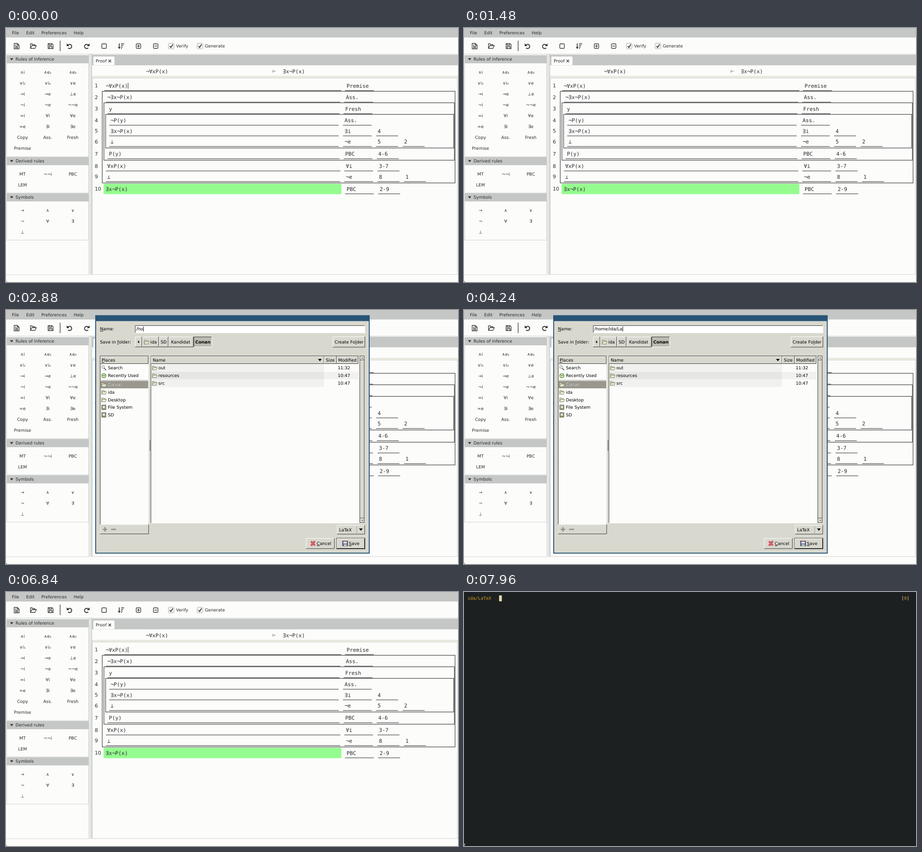
Animation of 998x561 px, one loop 8000 ms. Source, as an HTML page:

```html
<!DOCTYPE html>
<html lang="en">
<head>
<meta charset="utf-8">
<title>Proof editor export</title>
<style>
html, body { margin: 0; width: 100%; height: 100%; overflow: hidden; background: #fcfdfa; }
svg { display: block; width: 998px; height: 561px; }
text { font: 9.5px "DejaVu Sans", sans-serif; fill: #2b2b2b; white-space: pre; text-rendering: geometricPrecision; }
.mono { font: 11.6px "DejaVu Sans Mono", monospace; }
.term { font: 9.6px "DejaVu Sans Mono", monospace; }
.num { font-size: 11px; }
.bold { font-weight: bold; }
.mid { text-anchor: middle; }
.black { fill: #000; }
.white { fill: #fff; }
</style>
</head>
<body>
<svg id="stage" viewBox="0 0 998 561"></svg>
<script>
const stage = document.getElementById('stage');
const LOOP = 8000;
const GREY = '#c4c7c5', INK = '#333', PANEL = '#d9d8cf', PAPER = '#fcfdfb';

// ---- drawing helpers; text is placed by its vertical centre, "_" marks a mnemonic
const rect = (x, y, x2, y2, fill, extra = '') =>
  `<rect x="${x}" y="${y}" width="${x2 - x}" height="${y2 - y}" fill="${fill}" ${extra}/>`;
const line = (x, y, x2, y2, color = INK, w = 1) =>
  `<path d="M${x} ${y}L${x2} ${y2}" stroke="${color}" stroke-width="${w}"/>`;
const path = (d, fill = 'none', stroke = 'none', w = 1.4) =>
  `<path d="${d}" fill="${fill}" stroke="${stroke}" stroke-width="${w}"/>`;
const text = (x, y, s, cls = '', size = 9.5) =>
  `<text x="${x}" y="${y + size * 0.36}" class="${cls}">` +
  s.replace(/_(.)/, '<tspan text-decoration="underline">$1</tspan>') + '</text>';
const mono = (x, y, s) => text(x, y, s, 'mono', 11.6);
const group = (id, body) => `<g id="${id}">${body}</g>`;
const at = (x, y, body) => `<g transform="translate(${x} ${y})">${body}</g>`;
const triangle = (x, y, r, color = INK) =>
  path(`M${x - r} ${y - r * .6}h${2 * r}l${-r} ${r * 1.3}z`, color);
const bevel = (x, y, x2, y2, fill = PANEL, sunk = false) => {
  const [a, b] = sunk ? ['#333', '#fff'] : ['#fff', '#333'];
  return rect(x, y, x2, y2, fill) +
    path(`M${x + .5} ${y2}V${y + .5}H${x2}`, 'none', a, 1) +
    path(`M${x} ${y2 - .5}H${x2 - .5}V${y}`, 'none', b, 1);
};

// ---- proof editor
function toolbar() {
  const outline = (d, w = 1.4) => path(d, 'none', INK, w);
  return at(23, 40, outline('M-5 -6H2L6 -2V6H-5ZM2 -6V-2H6M-3 -2H0M-3 1H4M-3 3.5H4', 1.3)) +
    at(60, 40, outline('M-6 4V-5H-2L-1 -3H4V-1M-6 5L-3 -1H7L4 5Z', 1.3)) +
    at(98.5, 40, outline('M-5.5 -5.5H3L5.5 -3V5.5H-5.5ZM-3 -5V-2H2V-5M-3 5V1H3V5', 1.4)) +
    line(119.5, 28, 119.5, 51, '#222', 1.2) +
    at(140, 40, outline('M-4 -1A4.7 4.7 0 1 1 -3 4', 1.9) + path('M-6 -6V0H0Z', INK)) +
    at(178.5, 40, outline('M4 -1A4.7 4.7 0 1 0 3 4', 1.9) + path('M6 -6V0H0Z', INK)) +
    rect(211.5, 35, 221.5, 45, 'none', `rx="1.5" stroke="${INK}" stroke-width="1.4"`) +
    at(254, 40, outline('M-4 -6V4M0 -5H7M0 -1.5H5M0 2H3.5M0 5.2H2', 1.7) + path('M-7 2H-1L-4 6.5Z', INK)) +
    [292.5, 330.5].map((x, i) =>
      rect(x - 5, 35, x + 5, 45, 'none', `rx="1.5" stroke="${INK}" stroke-width="1.3"`) +
      line(x - 3, 40, x + 3, 40, INK, 1.4) + (i ? '' : line(x, 37, x, 43, INK, 1.4))).join('') +
    [[358.5, 'Verify'], [422, 'Generate']].map(([x, s]) =>
      rect(x, 33.5, x + 12.5, 46, '#f4f5f3', 'rx="2" stroke="#aaa"') +
      path(`M${x + 3} 40L${x + 5.5} 43L${x + 10} 36`, 'none', INK, 1.8) +
      text(x + 17, 40, s)).join('');
}

function sidePane(y, bottom, title, rows) {
  return rect(1.5, y + .5, 182.5, bottom, PAPER, 'stroke="#d0d2cf"') +
    rect(1, y, 183, y + 18, GREY) + triangle(12.5, y + 9, 3.6) + text(21, y + 9, title) +
    rows.map((row, r) => row.split(' ').map((s, c) =>
      text(36.5 + 55.5 * c, y + 37.2 + 24.1 * r, s, 'mid')).join('')).join('');
}

const proof = [ // centre y, depth, formula, rule, references
  [127.5, 0, '¬∀xP(x)', 'Premise'],
  [153, 1, '¬∃x¬P(x)', 'Ass.'],
  [178.5, 2, 'y', 'Fresh'],
  [204, 3, '¬P(y)', 'Ass.'],
  [227.5, 3, '∃x¬P(x)', '∃i', '4'],
  [251, 3, '⊥', '¬e', '5', '2'],
  [278, 2, 'P(y)', 'PBC', '4-6'],
  [305, 1, '∀xP(x)', '∀i', '3-7'],
  [328.5, 1, '⊥', '¬e', '8', '1'],
  [355.5, 0, '∃x¬P(x)', 'PBC', '2-9'],
];

function proofRow([y, d, formula, rule, ...refs], i) {
  const under = (x, x2) => line(x, y + 10.7, x2, y + 10.7, '#222', 1.1);
  const r = -1.5 * d, last = i === proof.length - 1;
  return text(196, y, String(i + 1), 'num', 11) +
    (last ? rect(215.5, 344, 740.5, 367, '#95fc8f', 'rx="2"') : under(217 + 3.6 * d, 740 - 1.8 * d)) +
    mono(220 + 3.6 * d, y, formula) +
    mono(752 + r, y, rule) + under(748.5 + r, 812 + r) +
    refs.map((s, k) => mono(825 + 58.5 * k + r, y, s) +
      under(821.7 + 58.5 * k + r, 870.3 + 58.5 * k + r)).join('');
}

function editor() {
  const frame = (x, y, x2, y2) => rect(x, y, x2, y2, 'none', 'stroke="#555" stroke-width="1.4"');
  return rect(0, 0, 998, 561, PAPER) + rect(0, 0, 998, 21, GREY) +
    group('fileOn', rect(6, 0, 36, 21, '#149fc3')) +
    group('fileText', text(13, 11, 'File')) +
    text(44.5, 11, 'Edit') + text(78, 11, 'Preferences') + text(149.5, 11, 'Help') +
    toolbar() + line(0, 57.5, 998, 57.5, '#cfd1ce') +
    sidePane(60, 284, 'Rules of inference', ['∧i ∧e₁ ∧e₂', '∨i₁ ∨i₂ ∨e', '→i →e ⊥e',
      '¬i ¬e ¬¬e', '=i ∀i ∀e', '=e ∃i ∃e', 'Copy Ass. Fresh', 'Premise']) +
    sidePane(285, 364, 'Derived rules', ['MT ¬¬i PBC', 'LEM']) +
    sidePane(365, 468.5, 'Symbols', ['→ ∧ ∨', '¬ ∀ ∃', '⊥']) +
    line(183, 58, 183, 545, '#c9cbc9') + line(0, 545, 183, 545, '#d5d7d3') +
    rect(184.5, 58, 189.5, 545, '#e2e4e0') + line(189.5, 58, 189.5, 545, '#c4c6c4') +
    rect(190, 59, 998, 82, GREY) + rect(193, 63, 239.5, 82.5, PAPER, 'rx="1.5"') +
    text(198, 73, 'Proof') + path('M226.3 70L232 75.8M232 70L226.3 75.8', 'none', INK, 1.3) +
    line(190, 82.5, 998, 82.5, '#e4e6e0') +
    mono(309, 95.5, '¬∀xP(x)') + text(592.5, 95.5, '⊢', 'mid') + mono(611, 95.5, '∃x¬P(x)') +
    rect(190, 106, 998, 110.5, '#eef0e6') + line(190, 106.5, 998, 106.5, '#d6d8d0') +
    line(190, 110.5, 998, 110.5, '#c9cbc4') +
    path('M190.5 111V544.5H996.5V111', 'none', '#d2d4d0', 1) +
    frame(212.5, 139.7, 991.5, 342.3) + frame(216.3, 165.2, 990, 292) + frame(220, 190.7, 988.5, 265) +
    proof.map(proofRow).join('') +
    group('proofCaret', line(269.5, 121, 269.5, 134, '#222')) +
    rect(0, 559.5, 1.5, 561, '#333') +
    group('busy', path('M0 555.5H4L2 558L4 561H0Z', '#444'));
}

// ---- save dialog
const folder = (x, y) => at(x, y,
  path('M-5 4.5V-4H-1L0 -2.5H4V4.5Z', '#cfd3b4', '#777a62', .8) +
  path('M-5 4.5L-3 -.8H6L4 4.5Z', '#e8ebd3', '#777a62', .8));
const disk = (x, y) => at(x, y, rect(-4.5, -5, 4.5, 5, '#b9c29a', 'stroke="#333" stroke-width=".9"') +
  '<circle cy="-.6" r="3" fill="#eef0e0" stroke="#555" stroke-width=".6"/>' + rect(-3, 3, 3, 4.3, '#6a9a31'));

function button(x, y, x2, y2, label, tx, cls = 'black', sunk = false) {
  return bevel(x, y, x2, y2, sunk ? '#bdbbb1' : PANEL, sunk) + text(tx, (y + y2) / 2, label, cls);
}

function columns(sizeX) {
  return [['Name', 320.5, sizeX], ['Size', sizeX, 730], ['Modified', 730, 778]].map(([s, x, x2]) =>
    bevel(x, 102, x2, 119) + text(x + 3.5, 110.7, s, 'black')).join('') + triangle(sizeX - 9.5, 110.5, 4, '#000');
}

function sourceView() {
  return rect(209, 156.5, 314, 173, '#9a988e') +
    button(338, 59, 358.5, 82, 'SD', 341.5) + button(359, 59, 414, 82, 'Kandidat', 364.5) +
    button(414.5, 59, 455, 82, 'Conan', 418, 'black bold', true) + columns(702.5) +
    [['out', '11:32'], ['resources', '10:47'], ['src', '10:47']].map(([s, time], i) => {
      const y = 128 + 16.8 * i;
      return rect(321, y - 8.4, 702.5, y + 8.4, i % 2 ? '#e6e7e5' : '#f1f2ef') +
        (i % 2 ? rect(702.5, y - 8.4, 778, y + 8.4, '#f1f2ef') : '') +
        folder(328, y) + text(336.5, y, s, 'black') + text(732.5, y, time, 'black');
    }).join('');
}

function exportView() {
  return button(337.5, 59, 376.5, 82, 'LaTeX', 340.5, 'black bold', true) + columns(677) +
    rect(321, 119.6, 677, 136.4, '#f1f2ef') +
    path('M323.5 122.5H330L333 125.5V133.5H323.5Z', '#fff', '#888', .8) +
    text(336.5, 128, 'example.tex', 'black') + text(680, 128, '149 bytes', 'black') + text(732.5, 128, '14:09', 'black') +
    path('M218.5 479.5V489.5M213.5 484.5H223.5', 'none', '#3f7fb5', 2.6);
}

function places() {
  return text(225, 128, 'Search', 'black') + text(225, 145, 'Recently Used', 'black') +
    line(210, 155, 313, 155, '#aaa') +
    '<circle cx="214.5" cy="126" r="3.4" fill="#dfe6ea" stroke="#999"/>' + line(217, 128.5, 221, 133, '#444', 1.8) +
    '<circle cx="216" cy="145" r="4.6" fill="#dcebc5" stroke="#4a7a1c" stroke-width="1.4"/>' +
    path('M213.5 143L216 146L219 143', 'none', '#333', 1) +
    ['Conan', 'ida', 'Desktop', 'File System', 'SD'].map((s, i) => {
      const y = 164.7 + 16.75 * i;
      return (i < 3 ? folder : disk)(216, y) + text(225, y, s, 'black');
    }).join('');
}

function dialog() {
  return rect(197, 11.5, 803, 538, '#285577') + rect(199, 24.5, 801, 536, PANEL) +
    text(207.5, 42, '_Name:', 'black') + bevel(285, 34, 793, 51, '#fff', true) +
    text(287.5, 42, '', 'black').replace('<text', '<text id="field"') +
    group('fieldCaret', rect(0, 36.5, 1, 47.5, '#000')) +
    text(207.5, 70.5, 'Save in _folder:', 'black') +
    bevel(285, 59, 300.5, 82) + path('M294 67.5V73.5L290.5 70.5Z', '#000') +
    button(301, 59, 337.5, 82, 'ida', 318.5) + folder(310, 70.5) +
    button(721.5, 58.5, 793, 82.5, 'Create Fo_lder', 725.5) +
    bevel(207.5, 101, 315.5, 495, PANEL, true) + rect(209, 119, 314, 473, PAPER) +
    bevel(209, 102, 314.5, 119) + text(211, 110.7, '_Places', 'black') +
    bevel(207.5, 473.5, 315.5, 495) +
    path('M218.5 479.5V489.5M213.5 484.5H223.5M232 484.5H243', 'none', '#8c8e88', 2.6) +
    bevel(319.5, 101, 779.5, 471, PAPER, true) +
    bevel(781, 101, 792.5, 471, '#c3c1b7', true) + bevel(782, 102, 791.5, 111) + bevel(782, 111, 791.5, 460) +
    bevel(782, 460, 791.5, 470) + path('M784.5 107.5H789L786.7 104.5Z', '#777') + triangle(786.7, 465, 2.3, '#777') +
    Array.from({ length: 8 }, (_, i) => rect(317, 288 + 3 * i, 319, 289.5 + 3 * i, '#444')).join('') +
    group('sourceView', sourceView()) + group('exportView', exportView()) + places() +
    group('selectedPlace', text(225, 164.7, 'Conan', 'white')) +
    button(731, 475, 792.5, 495.5, 'LaTeX', 735.5) + triangle(783.5, 485, 4, '#000') + line(774.5, 478, 774.5, 493, '#999') +
    button(662.5, 504, 725.5, 527.5, '_Cancel', 686) +
    path('M673.5 511L682 520M682 510.5L673.5 520.5', 'none', '#a8283a', 4) +
    path('M673.5 511L682 520M682 510.5L673.5 520.5', 'none', '#ea6a78', 2) +
    rect(729.5, 503.5, 793, 528, '#222') + button(730.5, 504.5, 792, 527, '_Save', 757) +
    rect(743, 510, 754.5, 521, '#5a6f9c', 'stroke="#333" stroke-width=".8"') +
    rect(745, 510.5, 752.5, 515.5, '#f4f4f4') + rect(745, 511, 752.5, 512.3, '#c8464b') + rect(746, 517.5, 752, 521, '#ccc');
}

// ---- terminal
function terminal() {
  const span = (s, color) => `<tspan fill="${color}">${s}</tspan>`;
  return rect(0, 0, 998, 561, '#1d2021') +
    text(8, 14, span('ida/LaTeX ', '#d79921') + span('-', '#665c54'), 'term') +
    rect(77.5, 7.5, 83.5, 20.5, '#ebdbb2') +
    text(966, 14, span('[', '#ebdbb2') + span('0', '#d79921') + span(']', '#ebdbb2'), 'term') +
    path('M0 556.5H2.5M1 556.5V561', 'none', '#ddd', 1);
}

stage.innerHTML = editor() + group('dialog', dialog()) + group('terminal', terminal());

const parts = {};
stage.querySelectorAll('[id]').forEach(el => parts[el.id] = el);
const show = (id, on) => parts[id].style.display = on ? '' : 'none';

// ---- timeline (ms)
const OPEN = 1500, ENTER_FOLDER = 5280, SAVED = 6760, MENU = 7400, SWITCH = 7880;
const pathKeys = [2640, 2720, 2840, 2960, 3080, 3200, 3320, 3440, 3600, 3720, 4000, 4240, 4440, 4560, 4680, 4840];
const nameKeys = [5840, 5920, 6080, 6280, 6360, 6400, 6440, 6480, 6520, 6560, 6600];
const typed = (s, keys, t) => s.slice(0, keys.filter(k => k <= t).length);

function render(t) {
  const inFolder = t >= ENTER_FOLDER;
  const open = t >= OPEN && t < SAVED;
  show('dialog', open);
  show('sourceView', !inFolder);
  show('selectedPlace', !inFolder);
  show('exportView', inFolder);
  show('terminal', t >= SWITCH);
  show('fileOn', t >= MENU);
  parts.fileText.firstChild.style.fill = t >= MENU ? '#fff' : '';
  show('busy', t >= 7800);
  const blink = t < OPEN ? (t + 120) % 1000 < 500 : t >= SAVED && t < MENU && (t - SAVED) % 1000 < 500;
  show('proofCaret', blink);
  if (open) {
    parts.field.textContent = inFolder ? typed('example.tex', nameKeys, t) : typed('/home/ida/LaTeX/', pathKeys, t);
    const x = 288 + parts.field.getComputedTextLength();
    parts.fieldCaret.setAttribute('transform', `translate(${x} 0)`);
    show('fieldCaret', t < 1920 || t >= 2280);
  }
}

const start = performance.now();
function tick() {
  render((performance.now() - start) % LOOP);
  requestAnimationFrame(tick);
}
render(0);
requestAnimationFrame(tick);
</script>
</body>
</html>
```
